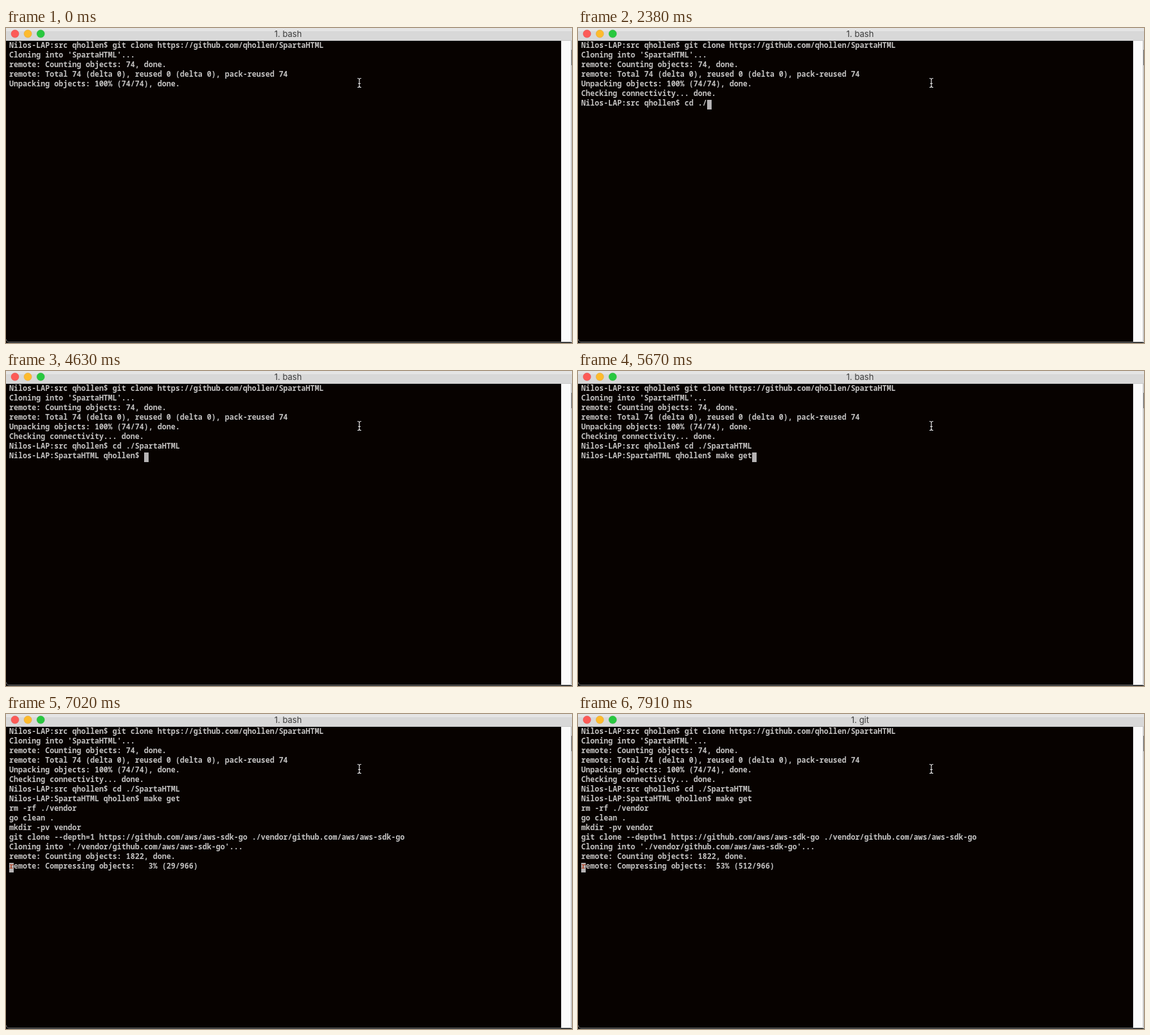
An HTML page that plays this animation: 881x491 px, repeating every 8 s.

```html
<!DOCTYPE html>
<html lang="en">
<head>
<meta charset="utf-8">
<title>Terminal</title>
<style>
  html, body { margin: 0; width: 100%; height: 100%; overflow: hidden; background: #070200; }
  #stage { position: absolute; left: 0; top: 0; width: 881px; height: 491px; overflow: hidden; background: #070200; }
  #stage > * { position: absolute; }
  #bar { left: 0; top: 0; width: 881px; height: 20px; background: linear-gradient(#e4e4e4 0 5px, #d8d8d8 5px 19px, #c9c9c9 19px); }
  #title { left: 339px; top: 0; width: 200px; line-height: 19px; text-align: center; color: #3c3c3c; font: 13px/19px Inter, Roboto, sans-serif; }
  #screen { left: 5px; top: 19px; margin: 0; color: #c3c2c1; font: 600 11.667px/15px "Noto Sans Mono", "DejaVu Sans Mono", monospace; white-space: pre; }
  #cursor { width: 7px; height: 15px; background: #b5b3b4; color: #b0533a; font: 600 11.667px/15px "Noto Sans Mono", "DejaVu Sans Mono", monospace; }
  #cursor span { position: absolute; left: 0; top: -3px; }
  #frame { left: 0; top: 0; }
</style>
</head>
<body>
<div id="stage">
  <div id="bar"></div>
  <div id="title"></div>
  <pre id="screen"></pre>
  <div id="cursor"><span></span></div>
  <svg id="frame" width="881" height="491">
    <circle cx="14" cy="9" r="6" fill="#fc5b57" stroke="#df4744" stroke-width=".5"/>
    <circle cx="34" cy="9" r="6" fill="#fdbb2d" stroke="#dea032" stroke-width=".5"/>
    <circle cx="54" cy="9" r="6" fill="#28c83f" stroke="#26ab35" stroke-width=".5"/>
    <path d="M864 20h15v469h-15z" fill="#fbfbfb"/>
    <path d="M864.5 20v469" stroke="#e3e3e3"/>
    <path d="M879 20h2v470h-2z" fill="#c9c9c9"/>
    <path d="M880 34h1v24h-1z" fill="#6b6b6b"/>
    <path d="M0 485q1 4.5 5 4.5H879" fill="none" stroke="#777"/>
    <path d="M0 490h881v1H0z" fill="#14191a"/>
    <g fill="none" stroke-linecap="round">
      <path id="beam" d="M547.5 78.5q2.5 0 2.5 2v10q0 2-2.5 2M552.5 78.5q-2.5 0-2.5 2v10q0 2 2.5 2M548.5 86.5h3" stroke="#e6e6e6" stroke-width="1.2"/>
    </g>
  </svg>
</div>
<script>
const LOOP = 8000, COL = 7, ROW = 15, LEFT = 5, TOP = 22;
const host = "Nilos-LAP", user = "qhollen";
const prompt = dir => `${host}:${dir} ${user}$ `;
const sdk = "github.com/aws/aws-sdk-go";

const cloned = [
  prompt("src") + `git clone https://github.com/${user}/SpartaHTML`,
  "Cloning into 'SpartaHTML'...",
  "remote: Counting objects: 74, done.",
  "remote: Total 74 (delta 0), reused 0 (delta 0), pack-reused 74",
  "Unpacking objects: 100% (74/74), done."
];
const ready = [...cloned, "Checking connectivity... done."];
const moved = [...ready, prompt("src") + "cd ./SpartaHTML"];
const fetching = [
  ...moved,
  prompt("SpartaHTML") + "make get",
  "rm -rf ./vendor",
  "go clean .",
  "mkdir -pv vendor",
  `git clone --depth=1 https://${sdk} ./vendor/${sdk}`,
  `Cloning into './vendor/${sdk}'...`
];
const counted = [...fetching, "remote: Counting objects: 1822, done."];

const compress = pct =>
  `remote: Compressing objects: ${String(pct).padStart(3)}% (${Math.ceil(pct * 9.66)}/966)`;

// Each step: start time, lines, cursor column (null hides it), title.
const steps = [[0, cloned, null, "bash"]];
function type(time, before, dir, text) {
  const line = prompt(dir) + text;
  steps.push([time, [...before, line], line.length, "bash"]);
}
[[140, ""], [1340, "c"], [1480, "cd "], [2230, "cd ."], [2380, "cd ./"], [2830, "cd ./S"],
 [3130, "cd ./Sp"], [3280, "cd ./Sparta"], [3730, "cd ./SpartaH"], [4030, "cd ./SpartaHTML"]
].forEach(([time, text]) => type(time, ready, "src", text));
[[4630, ""], [5070, "m"], [5220, "mak"], [5370, "make"], [5520, "make g"], [5670, "make get"]
].forEach(([time, text]) => type(time, moved, "SpartaHTML", text));
steps.push([6120, [...fetching, ""], 0, "bash"]);
[[7020, 3], [7160, 8], [7310, 17], [7460, 28], [7610, 39], [7760, 50], [7910, 53]
].forEach(([time, pct]) => steps.push([time, [...counted, compress(pct)], 0, time < 7160 ? "bash" : "git"]));

const el = id => document.getElementById(id);
const title = el("title"), screen = el("screen"), cursor = el("cursor");
const under = cursor.firstElementChild;
let shown = null;

function show(step) {
  const [, lines, col, name] = step;
  const row = lines.length - 1;
  title.textContent = "1. " + name;
  screen.textContent = lines.join("\n");
  cursor.style.display = col === null ? "none" : "block";
  cursor.style.left = LEFT + (col || 0) * COL + "px";
  cursor.style.top = TOP + row * ROW + "px";
  under.textContent = lines[row][col] || "";
}

function draw(now) {
  const time = now % LOOP;
  const step = steps.findLast(s => s[0] <= time);
  if (step !== shown) show(shown = step);
}

const start = performance.now();
function tick() {
  draw(performance.now() - start);
  requestAnimationFrame(tick);
}
tick();
</script>
</body>
</html>
```
